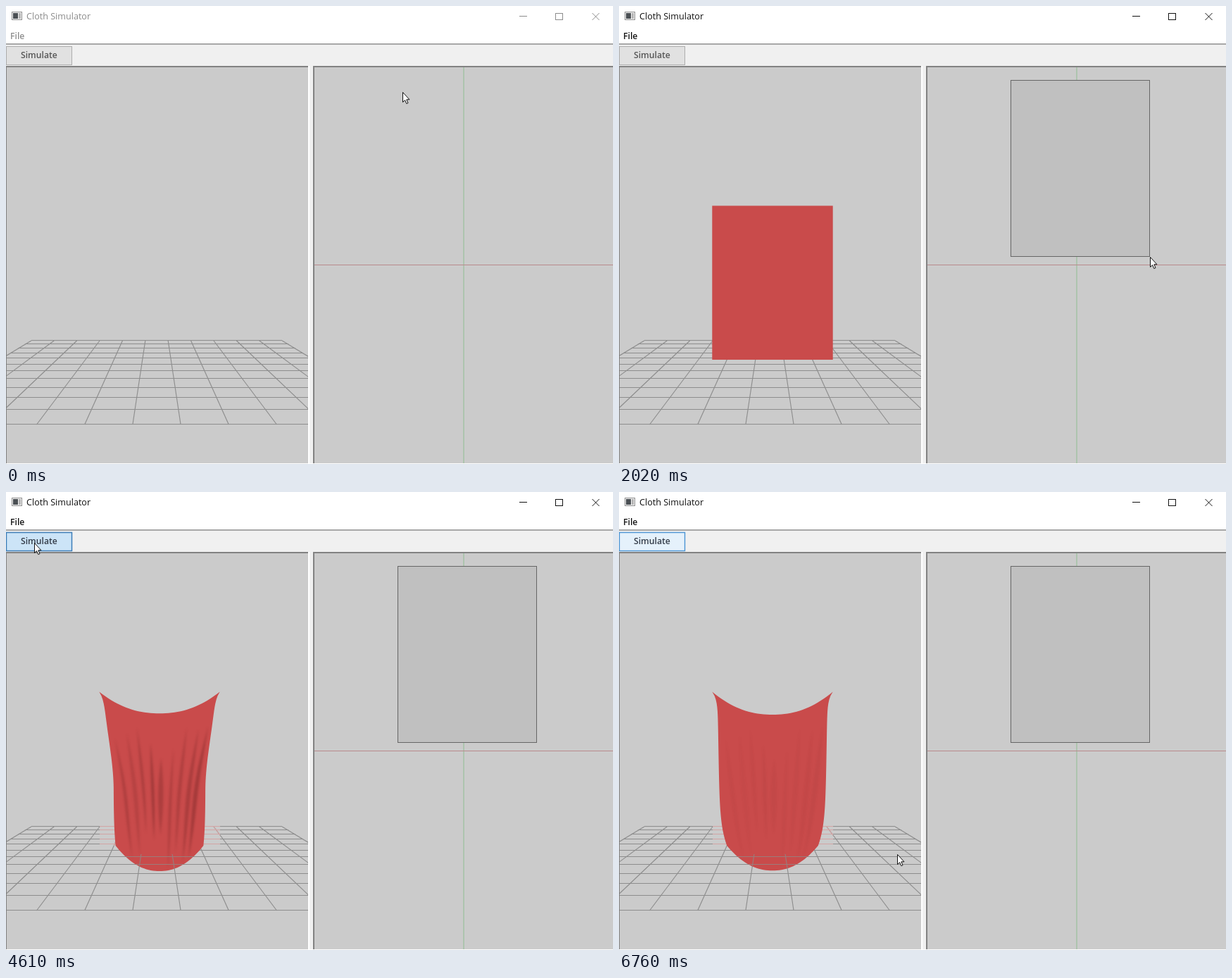
An HTML page with a canvas for the animation above (6.85 s loop, 862x650 px).

```html
<!DOCTYPE html>
<html lang="en">
<head>
<meta charset="utf-8">
<title>Cloth Simulator</title>
<style>
  html, body { margin: 0; width: 100%; height: 100%; overflow: hidden; background: #fff; }
  #stage { position: relative; width: 862px; height: 650px; overflow: hidden; }
  canvas, svg { position: absolute; left: 0; top: 0; }
  span { position: absolute; white-space: pre; font: 600 12.2px/16px "Open Sans", "Noto Sans", sans-serif; }
  #title { left: 29px; top: 7px; font-weight: 400; font-size: 12.6px; }
  #file { left: 6px; top: 35px; }
  #simulate { left: 21px; top: 62px; }
</style>
</head>
<body>
<div id="stage">
  <canvas width="862" height="650"></canvas>
  <span id="title">Cloth Simulator</span>
  <span id="file">File</span>
  <span id="simulate">Simulate</span>
  <svg width="862" height="650">
    <g id="pointer">
      <circle id="press" r="13.2" fill="#f0e61e" fill-opacity=".72"/>
      <path d="M.5 .5V14.5L3.6 11.6L5.8 16.6L8 15.6L5.8 10.8H10Z" fill="#fff" stroke="#111"/>
    </g>
  </svg>
</div>
<script>
const LOOP = 6850;
const STEP = 79.3; // interval between screen updates
const FOCUS = 370, RELEASE = 1790, CREATE = 2020, HOVER = 3110, CLICK = 3180, FALL = 3340, STOP = 6450;

const ctx = document.querySelector('canvas').getContext('2d');
const byId = id => document.getElementById(id);
const mix = (a, b, u) => a + (b - a) * u;
const clamp = u => Math.min(1, Math.max(0, u));
const smooth = u => clamp(u) ** 2 * (3 - 2 * clamp(u));
const easeOut = u => 1 - (1 - clamp(u)) ** 2;
const stepped = (t, phase) => phase + Math.floor((t - phase) / STEP + .01) * STEP;

const home = { x: 563, y: 122 };
const moves = [
  { from: 0, to: 220, x: 556, y: 104 },
  { from: FOCUS, to: 1340, x: 751, y: 354 },
  { from: 1560, to: RELEASE, x: 754, y: 356 },
  { from: 2270, to: 3188, x: 40, y: 72 },
  { from: 6560, to: 6760, x: 409, y: 531 }
];

function pointerAt(t) {
  return moves.reduce((at, move) => {
    const u = easeOut((t - move.from) / (move.to - move.from));
    return { x: mix(at.x, move.x, u), y: mix(at.y, move.y, u) };
  }, home);
}

// sag, hem: droop of the upper and lower edge; neck, waist, tuck: narrowing from top to bottom.
const flat = { sag: 0, hem: 0, neck: 0, waist: 0, waistAt: .5, tuck: 0, fold: 0 };
const gathered = { sag: 29, hem: 27, neck: .09, waist: .19, waistAt: .5, tuck: .08, fold: 1 };
const loose = { sag: 33.5, hem: 33, neck: .085, waist: .09, waistAt: .85, tuck: -.04, fold: .1 };
const rested = { sag: 32.5, hem: 35, neck: .095, waist: .03, waistAt: 1, tuck: .12, fold: .12 };

function blend(a, b, u) {
  return Object.fromEntries(Object.keys(a).map(key => [key, mix(a[key], b[key], u)]));
}

function poseAt(t) {
  const age = Math.max(0, t - FALL);
  let pose = blend(flat, gathered, smooth(age / 710));
  pose = blend(pose, loose, smooth((age - 730) / 1100));
  pose = blend(pose, rested, smooth((age - 1910) / 1000));
  pose.hem += 36 * Math.sin(Math.PI * age / 710) ** 2 * Math.exp(-age / 900);
  return pose;
}

// u runs across from -1 to 1, v down from 0 to 1.
function clothPoint(pose, u, v) {
  const narrowing = pose.neck * (1 - Math.exp(-20 * v)) + pose.waist * smooth(v / pose.waistAt) + pose.tuck * v ** 8;
  const droop = (1 - Math.abs(u) ** 2.2) * mix(pose.sag, pose.hem, v);
  return [218 + u * 85.7 * (1 - narrowing), 283.5 + 218.5 * v + droop];
}

function randomFrom(seed) {
  return () => (seed = seed * 16807 % 2147483647) / 2147483647;
}

function box(x, y, w, h, color) {
  ctx.fillStyle = color;
  ctx.fillRect(x, y, w, h);
}

function frame(x, y, w, h, color, width = 1) {
  ctx.strokeStyle = color;
  ctx.lineWidth = width;
  ctx.strokeRect(x, y, w, h);
}

function line(x1, y1, x2, y2) {
  ctx.beginPath();
  ctx.moveTo(x1, y1);
  ctx.lineTo(x2, y2);
  ctx.stroke();
}

function clipped(x, y, w, h, draw) {
  ctx.save();
  ctx.beginPath();
  ctx.rect(x, y, w, h);
  ctx.clip();
  draw();
  ctx.restore();
}

function drawGrid(color) {
  const horizon = 367.3, near = 226.7, far = 107.7, cells = 11;
  const spread = depth => 68.2 * depth / near;
  ctx.strokeStyle = color;
  ctx.lineWidth = 1.15;
  for (let i = 0; i <= cells; i++) {
    const k = i - cells / 2;
    const depth = 1 / mix(1 / near, 1 / far, i / cells);
    const half = spread(depth) * cells / 2;
    const y = Math.floor(horizon + depth - .45) + .5;
    line(214 - half, y, 214 + half, y);
    line(214 + spread(far) * k, horizon + far, 214 + spread(near) * k, horizon + near);
  }
}

function traceCloth(pose) {
  const n = 40;
  ctx.beginPath();
  for (let side = 0; side < 4; side++) {
    for (let i = 0; i < n; i++) {
      const s = i / n;
      const [u, v] = [[2 * s - 1, 0], [1, s], [1 - 2 * s, 1], [-1, 1 - s]][side];
      ctx.lineTo(...clothPoint(pose, u, v));
    }
  }
  ctx.closePath();
}

// Tapered dark folds that lean towards the middle of the hem.
function drawFolds(pose) {
  const random = randomFrom(29), count = 9;
  ctx.filter = 'blur(1.8px)';
  for (let i = 0; i < count; i++) {
    const u = mix(-.82, .86, (i + .4 * random()) / (count - 1));
    const top = mix(.1, .3, random()), bottom = mix(.75, 1, random());
    const width = mix(.03, .055, random());
    const edge = side => s => clothPoint(pose,
      u * (1.05 - .3 * s) + side * width * Math.sin(Math.PI * s), mix(top, bottom, s));
    ctx.beginPath();
    for (let s = 0; s <= 1; s += .1) ctx.lineTo(...edge(-1)(s));
    for (let s = 1; s >= 0; s -= .1) ctx.lineTo(...edge(1)(s));
    ctx.fillStyle = `rgba(105,32,32,${mix(.25, .6, random()) * pose.fold})`;
    ctx.fill();
  }
  ctx.filter = 'none';
}

function drawCloth(t) {
  const pose = poseAt(t);
  ctx.save();
  traceCloth(pose);
  ctx.fillStyle = '#c94b4b';
  ctx.fill();
  ctx.clip();
  if (pose.fold > 0) drawFolds(pose);
  clipped(132, 514, 172, 40, () => drawGrid('#9b7c7a'));
  ctx.restore();
}

function drawTitleBar(ink) {
  frame(8.5, 8.5, 14, 11, '#909090');
  box(9, 9, 13, 10, '#f2f2f2');
  box(10, 10, 7, 8, '#4c5155');
  box(18, 10, 3, 8, '#b4b4b4');
  ctx.strokeStyle = ink;
  line(729, 14.5, 740, 14.5);
  frame(780.5, 10.5, 10, 9, ink);
  line(832.5, 10, 842.5, 20);
  line(842.5, 10, 832.5, 20);
}

function drawPanel(x, right, border) {
  box(x, 85, right - x, 564, '#828282');
  box(x + border, 87, right - x - border, 562, '#cbcbcb');
}

const buttonLooks = {
  idle: { fill: '#e1e1e1', edge: '#adadad', width: 1 },
  hover: { fill: '#e5f1fb', edge: '#4a94d4', width: 1.4 },
  down: { fill: '#cce4f7', edge: '#3c7db8', width: 1.5 }
};

function drawWindow(ink, button) {
  box(0, 0, 862, 650, '#fff');
  box(0, 53, 862, 2, '#a8a8a8');
  box(0, 55, 862, 594, '#f0f0f0');
  drawTitleBar(ink);
  box(0, 57, 94, 27, button.fill);
  frame(.5, 57.5, 93, 26, button.edge, button.width);
  drawPanel(0, 429, 1);
  box(429, 85, 2, 564, '#fff');
  drawPanel(436, 862, 2);
  box(649.5, 87, 1, 562, '#8fbd91');
  box(438, 367, 424, 1, '#b98a8c');
}

function render(t) {
  const active = t >= FOCUS, created = t >= CREATE;
  const ink = active ? '#111' : '#8c8c8c';
  const look = t < HOVER ? 'idle' : t < CLICK || t > STOP ? 'hover' : 'down';
  const { x, y } = pointerAt(stepped(t, 60));
  drawWindow(ink, buttonLooks[look]);

  clipped(1, 87, 428, 562, () => {
    drawGrid('#8d8d8d');
    if (t > FALL + STEP) clipped(133, 474, 171, 28, () => drawGrid('#d2a4a4'));
    if (created) drawCloth(stepped(t, HOVER));
  });

  if (created) {
    box(556, 105, 198, 251, '#c0c0c0');
    frame(556.5, 105.5, 197, 250, '#666');
  } else if (active) {
    frame(556, 104.5, x - 556, y - 104.5, '#666', 2);
  }

  byId('title').style.color = byId('file').style.color = ink;
  byId('simulate').style.color = t < HOVER ? '#555' : '#333b48';
  byId('pointer').setAttribute('transform', `translate(${Math.round(x)} ${Math.round(y)})`);
  const pressed = active && t < RELEASE || t > CLICK && t < FALL;
  byId('press').style.display = pressed ? '' : 'none';
}

const begin = performance.now();
function tick() {
  render((performance.now() - begin) % LOOP);
  requestAnimationFrame(tick);
}
tick();
</script>
</body>
</html>
```
